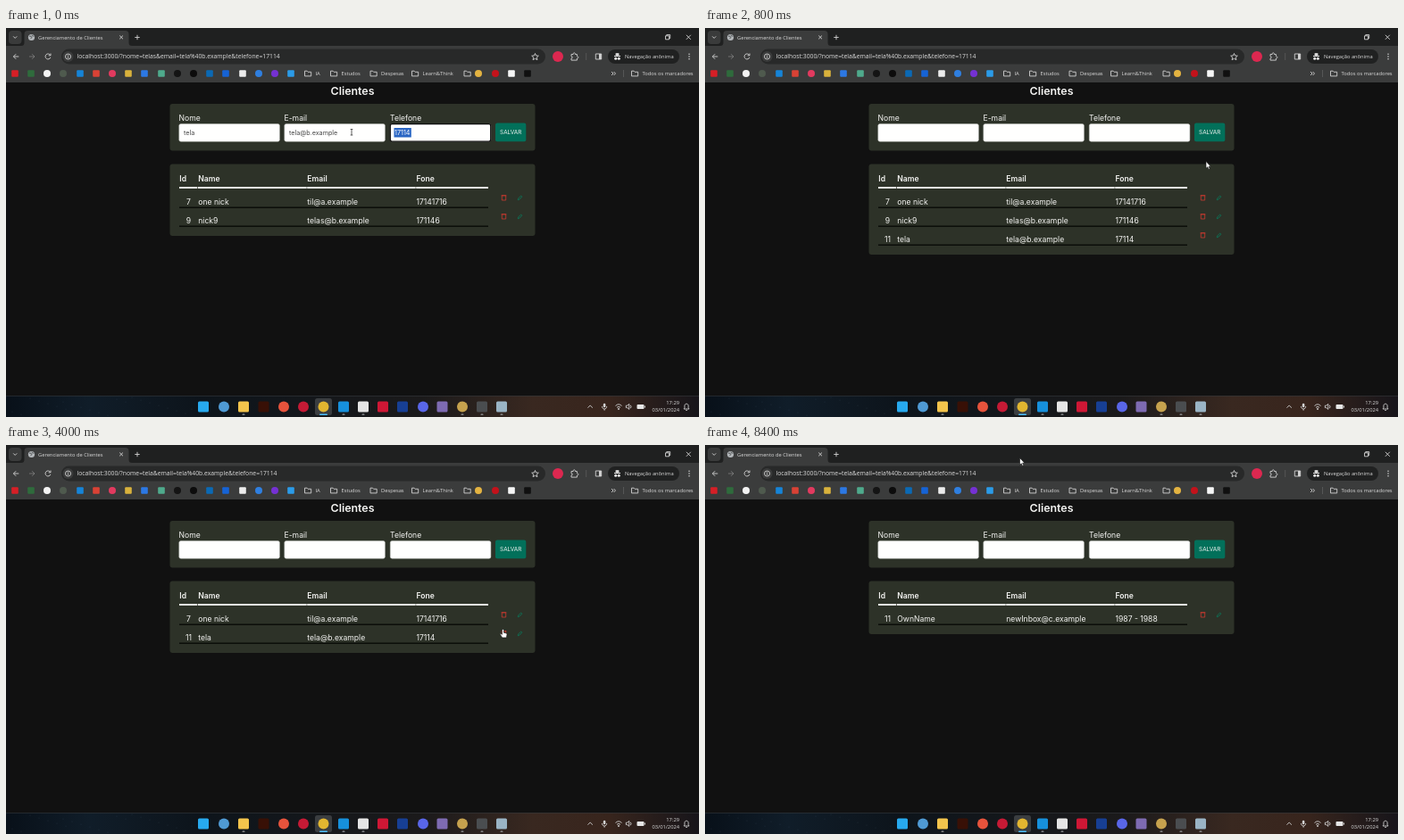
Animation, 776 px wide and 436 px high, one loop 8.56 s. Source, as an HTML page:

```html
<!DOCTYPE html>
<html lang="pt">
<head>
<meta charset="utf-8">
<title>Gerenciamento de Clientes</title>
<style>
  html, body { margin: 0; height: 100%; overflow: hidden; background: #111; }
  svg { display: block; width: 100vw; height: 100vh; }
  text { font-family: "Open Sans", sans-serif; font-size: 5.75px; fill: #dcdcdc; white-space: pre; }
  #page text { font-family: Inter, sans-serif; font-size: 8.6px; fill: #f4f4f2; }
  #page .title { font-size: 12.4px; font-weight: 600; text-anchor: middle; }
  #page .head { font-weight: 600; }
  #page .id { text-anchor: middle; }
  #page .value { font-size: 7.2px; fill: #444; }
  #page .picked { font-size: 7.2px; fill: #fff; }
  #page .button { font-size: 6.4px; text-anchor: middle; }
  .url { font-size: 6.8px; }
  .end { text-anchor: end; }
  .line { fill: none; stroke: #d2d2d2; stroke-width: .9; }
</style>
</head>
<body>
<svg viewBox="0 0 776 436" preserveAspectRatio="none">
  <defs>
    <linearGradient id="bar">
      <stop offset="0" stop-color="#081019"/>
      <stop offset=".12" stop-color="#101d29"/>
      <stop offset=".28" stop-color="#0d141b"/>
      <stop offset=".6" stop-color="#1b1a1b"/>
      <stop offset=".76" stop-color="#392820"/>
      <stop offset=".87" stop-color="#38251d"/>
      <stop offset="1" stop-color="#17151a"/>
    </linearGradient>
  </defs>
  <g id="page"></g>
  <g id="browser"></g>
  <g id="taskbar"></g>
  <text id="url" class="url" x="79.5" y="34.4"></text>
  <g id="cursor"></g>
</svg>
<script>
const LOOP = 8560, TICK = 80;
const el = id => document.getElementById(id);

const rect = (x, y, w, h, fill, r = 0, extra = '') =>
  `<rect x="${x}" y="${y}" width="${w}" height="${h}" rx="${r}" fill="${fill}" ${extra}/>`;
const circle = (x, y, r, fill) => `<circle cx="${x}" cy="${y}" r="${r}" fill="${fill}"/>`;
const text = (x, y, s, cls = '') => `<text x="${x}" y="${y}" class="${cls}">${s.replace(/&/g, '&amp;')}</text>`;
const line = (d, extra = '') => `<path class="line" d="${d}" ${extra}/>`;
const ring = (x, y, r) => `<circle class="line" cx="${x}" cy="${y}" r="${r}"/>`;
const folder = (x, y = 51) => line(`M${x - 3.5} ${y - 2.8}h2.6l1 1.1h3.6v4.6h-7.2z`);
const square = (x, y, size, fill, r = 1) => rect(x - size / 2, y - size / 2, size, size, fill, r);

function drawBrowser() {
  const marks = [
    [10, '#d61f26'], [28, '#2f6b3c'], [46, '#f2f2f2', 1], [64, '#4f5a4e', 1], [83, '#1684d8'],
    [101, '#d94235'], [119, '#e23a5f', 1], [137, '#d9b23c'], [155, '#2c78e4'], [174, '#4faa8c'],
    [192, '#141414', 1], [210, '#0c0c0c', 1], [228, '#0b69b5'], [246, '#1663d6'], [265, '#ececec'],
    [283, '#2f7fe0', 1], [301, '#7531d3', 1], [319, '#2b9be8'], [529, '#e3b341', 1], [548, '#c3121b', 1],
    [566, '#f6f6f6'], [584, '#101010']
  ];
  const folders = [[338, 'IA'], [367, 'Estudos'], [411.5, 'Despesas'], [458, 'Learn&Think'], [516.5, ''], [704, 'Todos os marcadores']];
  return rect(0, 0, 776, 20, '#1f2020') + rect(0, 20, 776, 41, '#3b3c3c') +
    rect(3, 3, 14.5, 15, '#3a3b3b', 4) + line('M8.2 9.4l2 2 2-2') +
    `<path d="M17 20q3.5 0 3.5-3.5V7q0-4 4-4h109q4 0 4 4v9.500q0 3.500 3.500 3.500z" fill="#3b3c3c"/>` +
    circle(28.500, 10.500, 3.600, '#b4b8bb') + line('M26 9.200h2l1 1.500-1.500 1M29 7.600l.5 1.300 2 .3', 'style="stroke:#4b4d4f"') +
    text(36, 12.600, 'Gerenciamento de Clientes') +
    line('M127.200 8.500l3.800 3.800m0-3.800l-3.800 3.800M147 7.800v5.400m-2.700-2.700h5.400') +
    line('M738.500 8.800h4v4h-4zM739.700 8.800v-1.200h4v4h-1.200M761.800 7.800l5 5m0-5l-5 5') +
    rect(62, 23.500, 542, 17, '#282929', 8.500) + circle(69.500, 32, 6, '#3b3c3c') +
    line('M14.300 32H8.500m2.700-2.800L8.400 32l2.800 2.800') +
    line('M26 32h5.800m-2.700-2.800l2.800 2.800-2.800 2.800', 'opacity=".4"') +
    line('M49.700 30.500a3 3 0 1 0 .2 2.400M50 28.500v2.300h-2.300') +
    ring(69.500, 32, 3) + line('M69.500 31.600v2M69.500 30v.8') +
    line('M592.500 28.500l1.100 2.500 2.700.2-2 1.800.6 2.700-2.400-1.400-2.400 1.400.6-2.700-2-1.800 2.700-.2z') +
    circle(618, 32, 6, '#dc2850') +
    line('M633 29.500h2.200c-.4-2.200 2.600-2.200 2.200 0h2v2.200c2 0 2 2.400 0 2.400v2h-6.400v-2c1.700-.2 1.700-2.200 0-2.400z') +
    rect(649.500, 28, .6, 8, '#666') + line('M660.300 29h6.400v6h-6.400z') + rect(664, 29, 2.700, 6, '#d2d2d2') +
    rect(674, 24, 80, 16, '#202121', 8) +
    rect(681, 31, 7, 1, '#eee') + rect(682.500, 28.300, 4, 2.500, '#eee', .7) +
    circle(682.700, 34.300, 1.500, '#eee') + circle(686.300, 34.300, 1.500, '#eee') +
    text(693, 34, 'Navegação anônima') +
    [29.300, 32, 34.700].map(y => circle(765, y, .75, '#ddd')).join('') +
    marks.map(([x, fill, round]) => round ? circle(x, 51, 4, fill) : square(x, 51, 7.600, fill)).join('') +
    folders.map(([x, name]) => folder(x) + text(x + 8.500, 53, name)).join('') +
    line('M678 49l2 2-2 2m2.500-4l2 2-2 2') + rect(691, 47, .6, 8, '#6a6a6a');
}

function drawTaskbar() {
  const apps = [
    [221, '#27a9ee'], [244, '#4f9ad4', 1], [266, '#f3c44c'], [288.500, '#381006'], [311, '#e6533c', 1],
    [333, '#c51a35', 1], [355.500, '#e2b630', 1], [378, '#1690dc'], [400, '#e5e5e5'], [422, '#cf1735'],
    [444, '#173f94'], [467, '#5966e8', 1], [488.500, '#7e6bb2'], [511, '#c6a24e', 1], [533, '#4a4d50'], [555, '#9ab4c5']
  ];
  let stars = '';
  for (let i = 0; i < 24; i++)
    stars += circle(i * 67 % 211, 414 + i * 13 % 21, .3, '#52677a');
  return rect(0, 412, 776, 24, 'url(#bar)') + rect(0, 412, 776, .6, '#34383b') + stars +
    rect(346, 415, 19, 19, '#3a3d40', 2.500) +
    apps.map(([x, fill, round]) => round ? circle(x, 424.500, 6, fill) : square(x, 424.500, 12, fill, 1.500)).join('') +
    [266, 378, 400, 511, 533, 555].map(x => rect(x - 1.500, 432.600, 3, 1.200, '#9a9da0', .6)).join('') +
    rect(351, 432.500, 9, 1.400, '#4cc2ff', .7) +
    line('M651.500 425.700l2.700-2.700 2.700 2.700') +
    rect(668.800, 420.800, 2.600, 4.500, '#d2d2d2', 1.300) + line('M667.500 424c0 4 5.200 4 5.200 0M670.100 427v1.700') +
    line('M682.500 423.500q3.500-3.400 7 0M684 425.300q2-1.800 4 0') + circle(686, 427, .9, '#ddd') +
    line('M694.300 423.200h1.500l2-1.800v6l-2-1.800h-1.500zM699.300 422.800q1.500 1.700 0 3.400') +
    rect(706.500, 422, 8, 5, '#e6e6e6', 1) + rect(715, 423.500, .9, 2, '#e6e6e6') +
    text(754, 422.300, '17:29', 'end') + text(754, 430.300, '03/01/2024', 'end') +
    line('M759 427h6l-.9-1.300v-2.200c0-3-4.200-3-4.200 0v2.200zM761.200 428.500h1.600');
}

const rows = {
  first: [7, 'one nick', 'til@a.example', '17141716'],
  second: [9, 'nick9', 'telas@b.example', '171146'],
  added: [11, 'tela', 'tela@b.example', '17114'],
  edited: [11, 'OwnName', 'newInbox@c.example', '1987 - 1988']
};

function visibleRows(t) {
  const { first, second, added, edited } = rows;
  if (t < 720) return [first, second];
  if (t < 4000) return [first, second, added];
  if (t < 4560) return [first, added];
  return [t < 6320 ? added : edited];
}

function drawRow([id, name, email, phone], i, picked) {
  const y = 198 + 21 * i;
  return rect(194, y + 2.500, 346, 1.400, '#090b07') +
    (picked ? rect(201.500, y - 8, 6.500, 12, '#1d52ae') : '') +
    text(204.500, y, String(id), 'id') + text(215.300, y, name) + text(337.300, y, email) + text(459.500, y, phone) +
    line(`M555.300 ${y - 10.200}h4.400v5.200h-4.400zM554.600 ${y - 10.200}h5.800`, 'style="stroke:#cf3a30;stroke-width:.8"') +
    line(`M573.300 ${y - 5.300}l.4-1.700 3-3 1.200 1.200-3 3z`, 'style="stroke:#087a5c;stroke-width:.8"');
}

function drawPage(t) {
  if (t >= 720 && t < 800) return rect(0, 61, 776, 351, '#fffffe');
  const list = visibleRows(t), filled = t < 720;
  const labels = [[193.500, 'Nome'], [311.500, 'E-mail'], [430, 'Telefone']];
  return rect(0, 61, 776, 351, '#111') + text(388, 74.600, 'Clientes', 'title') +
    rect(183.500, 85, 409, 52.500, '#2d3228', 3) +
    rect(183.500, 152.500, 409, 38.500 + 21 * list.length, '#2d3228', 3) +
    labels.map(([x, s]) => text(x, 104, s) + rect(x + .3, 107.500, 112.600, 19.700, '#fffffe', 2, 'stroke="#bfc2bc" stroke-width=".5"')).join('') +
    (filled
      ? text(199, 119.500, 'tela', 'value') + text(317, 119.500, 'tela@b.example', 'value') +
        rect(430.300, 107.700, 112.400, 19.400, 'none', 2, 'stroke="#101010" stroke-width="1.200"') +
        rect(434.500, 112, 19.300, 10.500, '#2a66c4') + text(435, 119.500, '17114', 'picked')
      : '') +
    rect(548, 106.500, 34.300, 20.700, '#02705a', 2) + text(565.200, 119.200, 'SALVAR', 'button') +
    [[194.300, 'Id'], [215.300, 'Name'], [337.300, 'Email'], [459.500, 'Fone']].map(([x, s]) => text(x, 172.300, s, 'head')).join('') +
    [[194, 20.300], [215, 121.700], [337.200, 121.500], [459.200, 80.800]].map(([x, w]) => rect(x, 178, w, 1.900, '#f8f8f5')).join('') +
    list.map((row, i) => drawRow(row, i, i === 2 && t >= 2320 && t < 2480)).join('');
}

// Pointer path: time, x, y of the tip
const path = [
  [0, 387, 117], [400, 566, 116], [560, 564, 118], [720, 561, 149.500], [880, 561, 149.500],
  [1760, 208, 236], [1920, 206, 236.500], [2240, 206, 236.500], [2320, 210.500, 237], [2400, 211, 239],
  [2720, 215, 267], [2880, 215, 267], [3440, 603, 236], [3760, 556.500, 206.500], [4080, 556.500, 206.500],
  [4400, 557, 187], [4480, 557, 187], [5200, 573, 192.500], [5280, 573, 192.500], [5760, 574.500, 189],
  [6240, 574.500, 189], [6560, 487, 252], [7840, 487, 252], [8240, 325, 60], [8400, 352.500, 14.500], [LOOP, 352.500, 14.500]
];

function pointerAt(t) {
  const i = path.findIndex(p => p[0] > t);
  const [t0, x0, y0] = path[i - 1], [t1, x1, y1] = path[i];
  const u = (t - t0) / (t1 - t0), k = u * u * (3 - 2 * u);
  return [x0 + (x1 - x0) * k, y0 + (y1 - y0) * k];
}

function drawCursor(t) {
  const [x, y] = pointerAt(t);
  const onButton = t >= 320 && t < 640, onIcons = t >= 3760 && t < 6320;
  let shape = '<path d="M0 0v7.800l1.800-1.600 1.200 2.700 1.300-.6-1.200-2.600h2.300z" fill="#fff" stroke="#111" stroke-width=".6"/>';
  if (t < 160) shape = line('M-1.300-3.500h2.600M0-3.500v6.500M-1.300 3h2.600', 'style="stroke:#333;stroke-width:.8"');
  else if (onButton || onIcons)
    shape = '<path d="M-1 .8q1-1.600 2 0v3l2.600.6q1 .3.900 1.400l-.6 3.600h-4.700l-2.400-3.700q0-1.300 2.200.1z" fill="#fff" stroke="#111" stroke-width=".6"/>';
  return `<g transform="translate(${x} ${y})">${shape}</g>`;
}

el('browser').innerHTML = drawBrowser();
el('taskbar').innerHTML = drawTaskbar();

let shown = -1;
function render() {
  const t = Math.floor(performance.now() % LOOP / TICK) * TICK;
  if (t !== shown) {
    shown = t;
    el('page').innerHTML = drawPage(t);
    el('cursor').innerHTML = drawCursor(t);
    el('url').textContent = `localhost:3000/?nome=${t < 640 ? 'telas' : 'tela'}&email=tela%40b.example&telefone=17114`;
  }
  requestAnimationFrame(render);
}
render();
</script>
</body>
</html>
```
